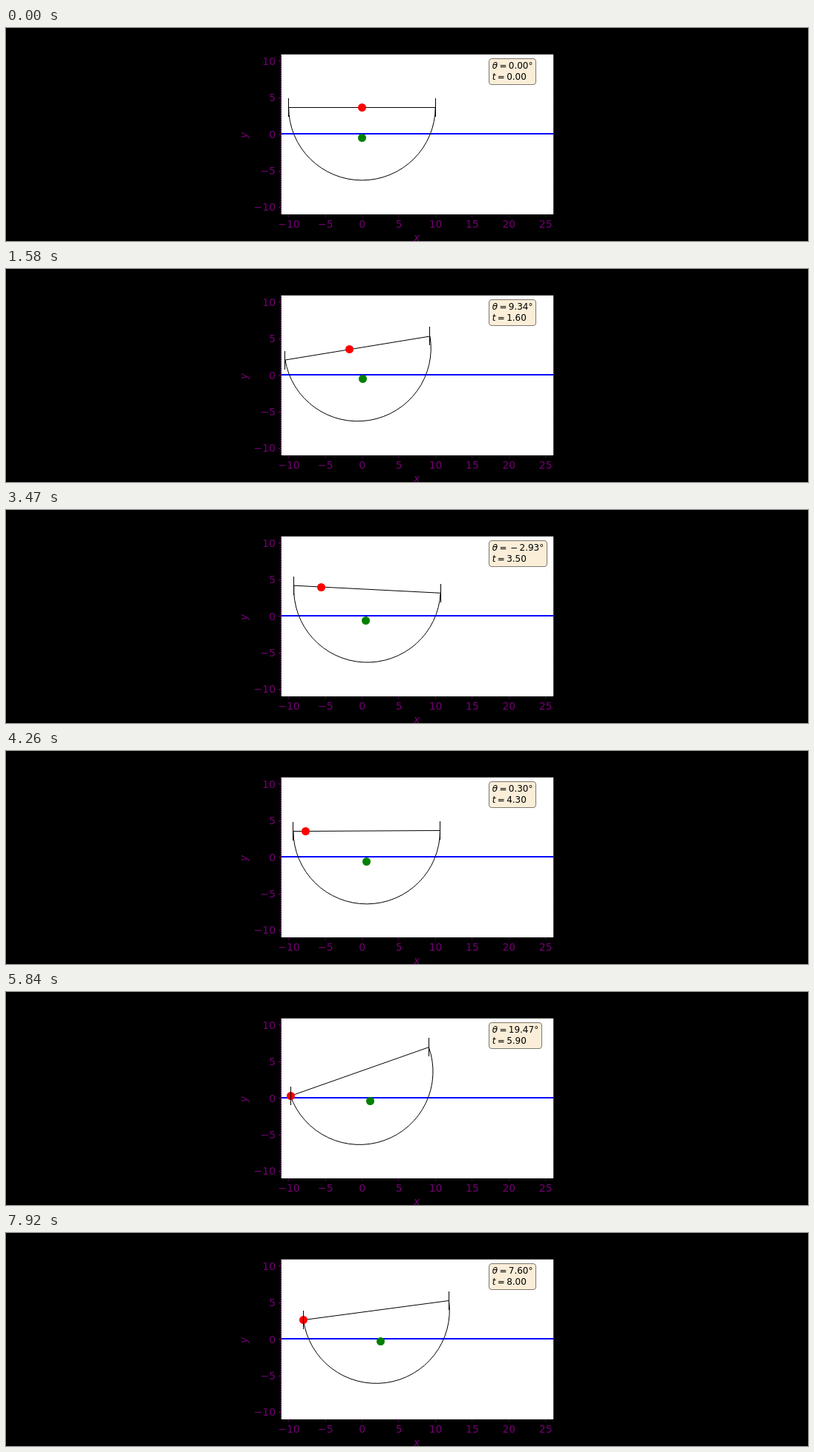
An HTML page with a canvas for the animation above (8000 ms loop, 1080 by 288 pixels).

```html
<!DOCTYPE html>
<html lang="en">
<head>
<meta charset="utf-8">
<title>Rolling ship with sliding load</title>
<style>
html, body { margin: 0; width: 100%; height: 100%; overflow: hidden; background: #000; }
canvas { display: block; }
</style>
</head>
<body>
<canvas id="stage" width="1080" height="288"></canvas>
<script>
const ctx = document.getElementById('stage').getContext('2d');

// Timing: one simulated step of 0.1 s is shown about every 99 ms
const LOOP = 8000, LAST = 80;
const stepStart = n => Math.round(n * 9.9) * 10;

// Physics: floating half cylinder with a load sliding between two fences
const G = 9.81, R = 10, H = 4 * R / (3 * Math.PI);
const DENSITY = 0.5, LOAD = 0.08, OMEGA0 = 0.2;
const MASS = DENSITY * Math.PI * R * R / 2;
const INERTIA = R * R / 2 * (1 - 32 / (9 * Math.PI ** 2));
const DT = 0.01;

function submerged(height) {
  const beta = 2 * Math.acos(Math.max(-1, Math.min(1, height / R)));
  return R * R / 2 * (beta - Math.sin(beta));
}

function floatHeight() {
  let lo = 0, hi = R;
  for (let i = 0; i < 60; i++) {
    const mid = (lo + hi) / 2;
    if (submerged(mid) > MASS * (1 + LOAD)) lo = mid; else hi = mid;
  }
  return lo;
}

// State: x, y, angle, load position, then their velocities
function rates([x, y, a, s, vx, vy, w, vs]) {
  const sin = Math.sin(a), cos = Math.cos(a);
  const lift = submerged(y + H * cos) * G / MASS;
  const push = LOAD * G * cos;
  return [vx, vy, w, vs,
    push * sin,
    lift - G - push * cos,
    (-lift * H * sin - push * s) / INERTIA,
    -G * sin];
}

function advance(q) {
  const shift = (k, d) => q.map((v, i) => v + k[i] * d);
  const k1 = rates(q);
  const k2 = rates(shift(k1, DT / 2));
  const k3 = rates(shift(k2, DT / 2));
  const k4 = rates(shift(k3, DT));
  const next = q.map((v, i) => v + DT / 6 * (k1[i] + 2 * k2[i] + 2 * k3[i] + k4[i]));
  if (Math.abs(next[3]) >= R) {
    next[3] = Math.sign(next[3]) * R;
    next[7] = 0;
  }
  return next;
}

function simulate() {
  let q = [0, floatHeight() - H, 0, 0, 0, 0, OMEGA0, 0];
  const out = [q];
  for (let n = 1; n <= LAST; n++) {
    for (let i = 0; i < 10; i++) q = advance(q);
    out.push(q);
  }
  return out;
}
const states = simulate();

// Drawing
const UNIT = 9.88, X0 = 479.4, Y0 = 143.6;
const BOX = [371, 36, 366, 216];
const px = x => X0 + x * UNIT;
const py = y => Y0 - y * UNIT;
const snap = v => Math.floor(v) + 0.5;
const FACE = '"DejaVu Sans", sans-serif';
const PURPLE = '#740074';

function line(x1, y1, x2, y2, color = '#000', width = 1, dash = []) {
  ctx.strokeStyle = color;
  ctx.lineWidth = width;
  ctx.setLineDash(dash);
  ctx.beginPath();
  ctx.moveTo(x1, y1);
  ctx.lineTo(x2, y2);
  ctx.stroke();
  ctx.setLineDash([]);
}

function dot(x, y, color) {
  ctx.fillStyle = color;
  ctx.beginPath();
  ctx.arc(snap(px(x)), snap(py(y)), 5.5, 0, 2 * Math.PI);
  ctx.fill();
}

function label(text, x, y, align, italic) {
  ctx.font = (italic ? 'italic ' : '') + '13.9px ' + FACE;
  ctx.textAlign = align;
  ctx.fillStyle = PURPLE;
  ctx.fillText(text, x, y);
}

const signed = v => String(v).replace('-', '\u2212');

function axes() {
  ctx.fillStyle = '#000';
  ctx.fillRect(0, 0, 1080, 288);
  ctx.fillStyle = '#fff';
  ctx.fillRect(...BOX);
  line(371, 35.5, 737, 35.5, '#888', 1, [1, 1]);
  line(737.5, 36, 737.5, 252, '#555', 1, [1, 1]);
  line(370.5, 36, 370.5, 252, '#c000c0', 1, [2, 1]);
  for (let v = -10; v <= 25; v += 5) {
    line(snap(px(v)), 252, snap(px(v)), 256, '#400040');
    label(signed(v), px(v) + 0.3, 270, 'center');
  }
  for (let v = -10; v <= 10; v += 5) {
    line(367, snap(py(v)), 370, snap(py(v)), '#600060');
    label(signed(v), 363, Math.round(py(v) + 5), 'right');
  }
  label('x', 553, 288, 'center', true);
  ctx.save();
  ctx.translate(324.5, 145);
  ctx.rotate(-Math.PI / 2);
  label('y', 0, 0, 'center', true);
  ctx.restore();
}

// Runs of one formula; operators get a thin space on both sides
function formula(name, value, x, y, paint) {
  const size = 12, gap = 0.195 * size;
  const put = (text, style, space) => {
    ctx.font = style + size + 'px ' + FACE;
    if (paint) ctx.fillText(text, x + space, y);
    x += ctx.measureText(text).width + 2 * space;
  };
  put(name, 'italic ', 0);
  put('=', '', gap);
  if (value[0] === '-') put('\u2212', '', gap);
  put(value.replace('-', ''), '', 0);
  return x;
}

function readout(angle, time) {
  const left = 654.7, deg = (angle * 180 / Math.PI).toFixed(2) + '°';
  ctx.textAlign = 'left';
  const right = formula('θ', deg, left, 55, false);
  ctx.beginPath();
  ctx.roundRect(650.5, 41.5, snap(right + 4) - 650.5, 35, 3.5);
  ctx.fillStyle = '#faeed9';
  ctx.fill();
  ctx.strokeStyle = '#7d776d';
  ctx.lineWidth = 1;
  ctx.stroke();
  ctx.fillStyle = '#000';
  formula('θ', deg, left, 55, true);
  formula('t', time.toFixed(2), left, 70, true);
}

function draw(n) {
  const [x, y, a, s] = states[n];
  const sin = Math.sin(a), cos = Math.cos(a);
  const cx = x - H * sin, cy = y + H * cos;
  const deck = d => [cx + d * cos, cy + d * sin];
  axes();
  ctx.save();
  ctx.beginPath();
  ctx.rect(...BOX);
  ctx.clip();
  line(371, 143, 737, 143, '#00f', 2);

  const [[x1, y1], [x2, y2]] = [deck(-R), deck(R)];
  const level = a === 0 ? snap : v => v;
  line(px(x1), level(py(y1)), px(x2), level(py(y2)));
  ctx.beginPath();
  ctx.arc(px(cx), py(cy), R * UNIT, -a, Math.PI - a);
  ctx.stroke();

  dot(...deck(s), '#f00');
  dot(x, y, '#008000');
  for (const [ex, ey] of [[x1, y1], [x2, y2]]) {
    const fx = snap(px(ex)), fy = snap(py(ey));
    line(fx, fy - 12.5, fx, fy + 12.5);
  }
  ctx.restore();
  readout(a, n / 10);
}

const start = performance.now();
function frame() {
  const t = (performance.now() - start) % LOOP;
  let n = LAST;
  while (n > 0 && stepStart(n) > t) n--;
  draw(n);
  requestAnimationFrame(frame);
}
frame();
</script>
</body>
</html>
```
